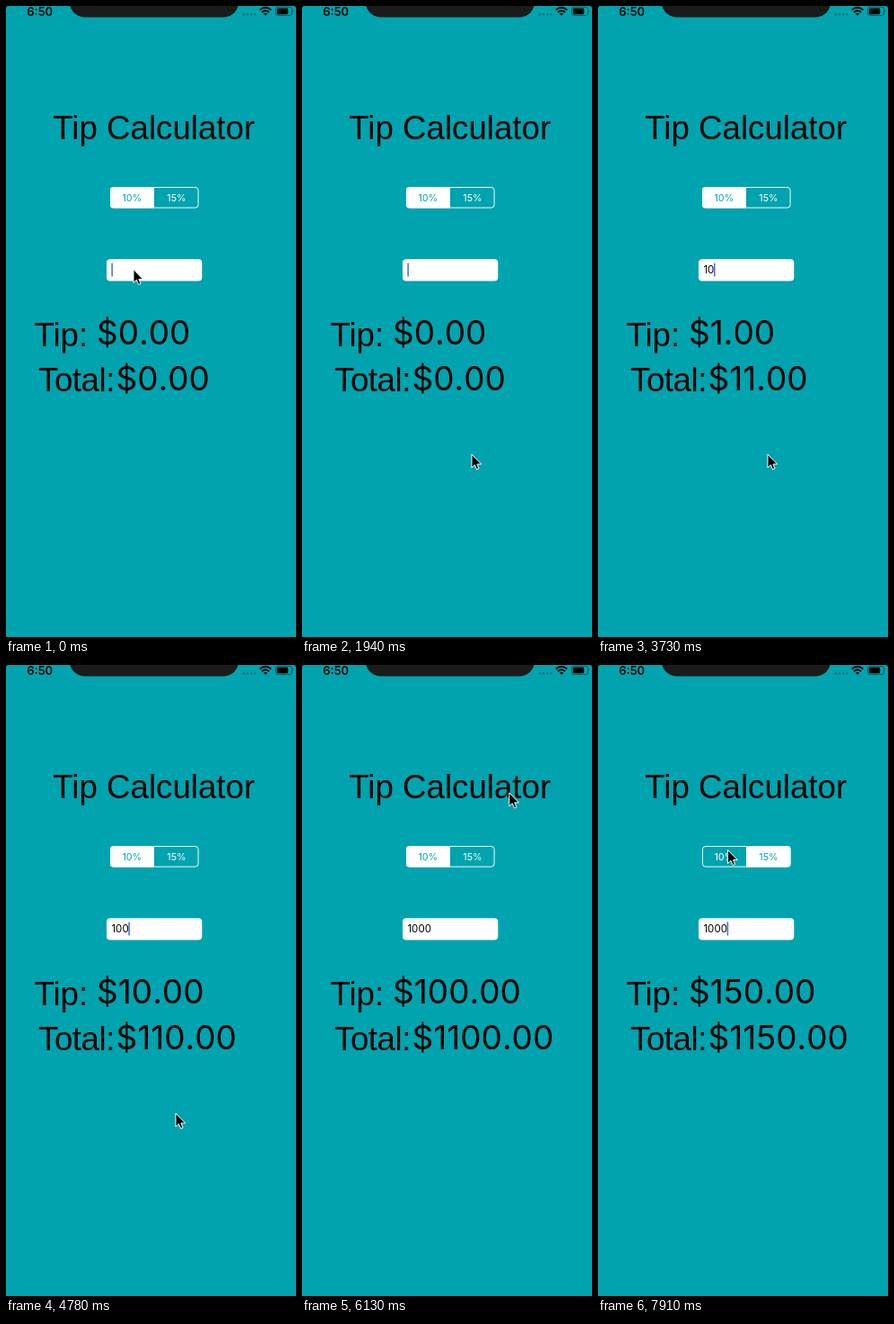
Write an HTML page that moves like this. It is 323x701 px and loops after 8000 ms.

```html
<!DOCTYPE html>
<html lang="en">
<head>
<meta charset="utf-8">
<title>Tip Calculator</title>
<style>
  html, body { margin: 0; width: 100%; height: 100%; overflow: hidden; background: #00a3ae; }
  svg { display: block; width: 100%; height: 100%; }
  text { font-family: Inter, Roboto, sans-serif; font-optical-sizing: none; }
  .label { font: 36.7px "Liberation Sans", Arial, sans-serif; }
  .tight { letter-spacing: -.012em; }
  .amount { font-size: 37px; }
  .amount, #bill { font-kerning: none; }
  .seg { font-size: 10.8px; text-anchor: middle; }
</style>
</head>
<body>
<svg viewBox="0 0 323 701">
  <rect width="323" height="701" fill="#00a3ae"/>

  <!-- status bar -->
  <path d="M0 0H2Q.5 .5 0 2ZM323 0H321Q322.5 .5 323 2Z" fill="#111"/>
  <path d="M71.4 0A17 17 0 0 0 88 12.5H242A17 17 0 0 0 258.6 0Z" fill="#1b1b1c"/>
  <text x="23.2" y="10.5" font-size="13" font-weight="600">6:50</text>
  <path d="M264.7 9.2h13" stroke="#000" stroke-opacity=".3" stroke-width="2.6" stroke-linecap="round" stroke-dasharray="0 4.25"/>
  <g fill="none" stroke="#000" stroke-width="1.9">
    <path d="M282.7 4.4Q289 -.8 295.3 4.4"/>
    <path d="M285 6.9Q289 3.6 293 6.9"/>
  </g>
  <path d="M286.7 8.5Q289 6.8 291.3 8.5L289 10.8Z"/>
  <rect x="300.5" y="1.2" width="18" height="9.3" rx="2.4" fill="none" stroke="#000" stroke-opacity=".45" stroke-width=".9"/>
  <rect x="301.8" y="2.4" width="12.4" height="6.9" rx="1.3"/>
  <path d="M319.6 4.2Q321.2 5.8 319.6 7.5Z" fill-opacity=".45"/>

  <text class="label" x="52.2" y="147.5">Tip Calculator</text>

  <!-- rate switch -->
  <path id="left" d="M165 201H119.5Q116 201 116 204.5V221Q116 224.5 119.5 224.5H165Z" fill="#fff"/>
  <path id="right" d="M165 201H211Q214.5 201 214.5 204.5V221Q214.5 224.5 211 224.5H165Z" fill="#fff"/>
  <rect x="116.5" y="201.5" width="97.6" height="22.6" rx="3.2" fill="none" stroke="#fff" stroke-width=".95"/>
  <text class="seg" id="ten" x="140.3" y="216.6">10%</text>
  <text class="seg" id="fifteen" x="190" y="216.6">15%</text>

  <!-- bill field -->
  <rect x="112" y="281.3" width="106.3" height="24.2" rx="4" fill="#fff"/>
  <text id="bill" x="117.4" y="297.4" font-size="11.6"></text>
  <rect id="caret" y="285.6" width="1.5" height="15" rx=".6" fill="#4468e6"/>

  <text class="label" x="31.4" y="378.4">Tip:</text>
  <text class="label tight" x="36" y="427.6">Total:</text>
  <text class="amount" id="tip" x="101" y="376"></text>
  <text class="amount" id="total" x="122.4" y="427"></text>

  <path id="pointer" d="M0 0V15L3.4 11.8L5.6 17L8.1 16L5.9 11H10.6Z" stroke="#fff" stroke-width="1" stroke-linejoin="round"/>
</svg>
<script>
  const LOOP = 8000, TICK = 149.2, TEAL = '#00a3ae';
  const PRESS = 6860, RELEASE = 7010;
  const keys = [2385, 2635, 4770, 5370];   // one digit of 1000 each
  const stops = [
    { x: 142, y: 292.5 },
    { x: 189, y: 498, start: 441, end: 1190, back: .8, bulge: 0 },
    { x: 193, y: 212.5, start: 5600, end: 6575, back: 3, bulge: 38 },
    { x: 144.6, y: 205.5, start: 7320, end: 7900, back: 0, bulge: 0 }
  ];

  const $ = id => document.getElementById(id);
  const set = (id, name, value) => $(id).setAttribute(name, value);
  const money = n => '$' + n.toFixed(2);
  const put = (id, text) => { if ($(id).textContent !== text) $(id).textContent = text; };

  // ease out, passing the goal by an amount set by `back`
  const easeOut = (p, back) => 1 + (1 + back) * (p - 1) ** 3 + back * (p - 1) ** 2;

  function pointerAt(t) {
    let { x, y } = stops[0];
    for (const s of stops.slice(1)) {
      if (t < s.start) break;
      const p = Math.min((t - s.start) / (s.end - s.start), 1);
      const k = easeOut(p, s.back);
      x += (s.x - x) * Math.min(k, 1) + s.bulge * Math.sin(Math.PI * p);
      y += (s.y - y) * k;
    }
    return `translate(${x} ${y})`;
  }

  // the caret blinks once a second, counted from the last key
  function caretAt(t) {
    const last = keys.findLast(k => k <= t) ?? -70;
    const phase = (t - last) % 1000;
    return phase < 540 ? 1 : phase < 690 ? .4 : 0;
  }

  function draw(t) {
    const bill = '1000'.slice(0, keys.filter(k => k <= t).length);
    const high = t >= RELEASE;
    const tip = bill * (high ? 15 : 10) / 100;
    put('bill', bill);
    put('tip', money(tip));
    put('total', money(+bill + tip));

    set('left', 'fill-opacity', high ? 0 : 1);
    set('right', 'fill-opacity', high ? 1 : t >= PRESS ? .17 : 0);
    set('ten', 'fill', high ? '#fff' : TEAL);
    set('fifteen', 'fill', high ? TEAL : '#fff');

    set('caret', 'x', 117.4 + (bill && $('bill').getComputedTextLength() - .4));
    set('caret', 'opacity', caretAt(t));
    set('pointer', 'transform', pointerAt(t));
  }

  const begin = performance.now();
  function frame() {
    const t = (performance.now() - begin) % LOOP;
    draw(Math.floor((t + 5) / TICK) * TICK);
    requestAnimationFrame(frame);
  }
  frame();
</script>
</body>
</html>
```
